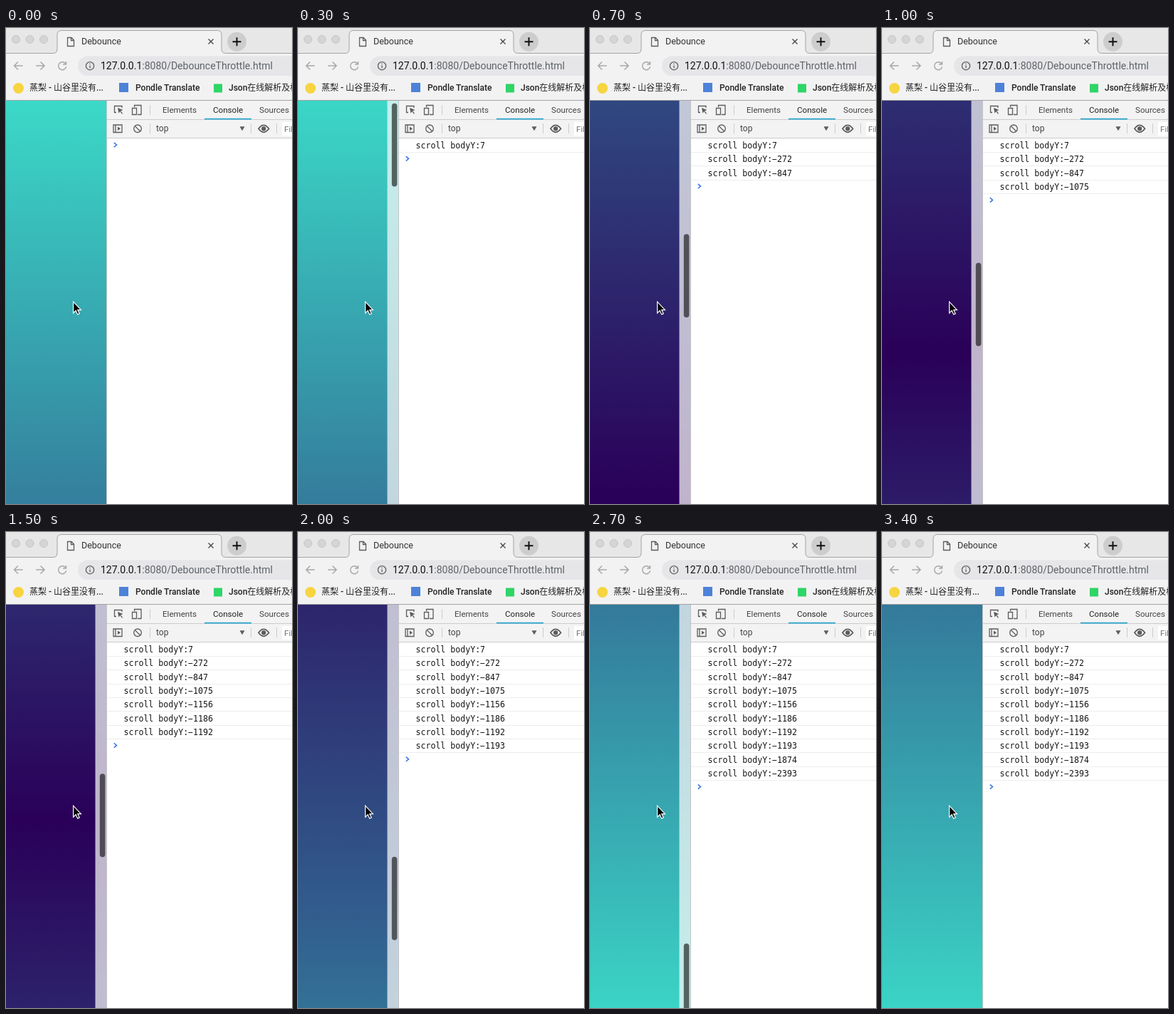
Animation, 402 px wide and 668 px high, one loop 3500 ms. Source, as an HTML page:

```html
<!DOCTYPE html>
<html lang="zh">
<head>
<meta charset="utf-8">
<title>Debounce</title>
<style>
  html, body { margin: 0; height: 100%; overflow: hidden; background: #fff; }
  svg { display: block; width: 402px; height: 668px; }
  text { font: 11.6px Roboto, "Noto Sans CJK SC", sans-serif; fill: #444; }
  .mark { font-size: 12px; font-weight: 500; fill: #222; }
  .log { font: 11.58px "DejaVu Sans Mono", monospace; fill: #151515; }
  .icon { fill: none; stroke: #5c5c5c; stroke-width: 1.3; }
  .rule { stroke: #ccc; }
</style>
</head>
<body>
<svg viewBox="0 0 402 668">
  <defs>
    <linearGradient id="sea" x2="0" y2="1">
      <stop offset="0" stop-color="#3bd9c8"/>
      <stop offset=".25" stop-color="#32618f"/>
      <stop offset=".5" stop-color="#2a0058"/>
      <stop offset=".75" stop-color="#32618f"/>
      <stop offset="1" stop-color="#3bd9c8"/>
    </linearGradient>
  </defs>

  <!-- scrolling page -->
  <rect id="page" width="142" height="3001" fill="url(#sea)"/>
  <g id="bar">
    <rect x="125.500" y="102" width="16.500" height="566" fill="#fafafa" fill-opacity=".72"/>
    <rect id="thumb" x="131.800" width="7.600" height="117" rx="3.800" fill-opacity=".58"/>
  </g>
  <path d="M94.600 384.200v15.800l3.600-3.400 2.400 5.400 2.600-1.100-2.400-5.300h4.600z" stroke="#fff" stroke-width="1.200"/>

  <!-- window frame -->
  <rect width="402" height="102" fill="#e8e7e8"/>
  <path d="M-2 35.500H66Q72 35.500 72 29.500V9.500Q72 3.500 78 3.500H297Q303 3.500 303 9.500V29.500Q303 35.500 309 35.500H404V101.500H-2Z" fill="#f2f2f2" stroke="#a3a3a3"/>
  <g fill="#d6d5d6" stroke="#c6c5c6">
    <circle cx="14" cy="16" r="5.500"/><circle cx="33.500" cy="16" r="5.500"/><circle cx="53" cy="16" r="5.500"/>
  </g>
  <path class="icon" d="M86.500 13.500h5.500l3.500 3.500v8.500h-9zM91.500 13.500v4h4"/>
  <text x="106" y="23.300" style="font-size:12.500px;fill:#333">Debounce</text>
  <path class="icon" d="M284.500 15.500l7 7m0-7l-7 7" style="stroke:#444"/>
  <circle cx="324.500" cy="19.300" r="13.500" fill="#cecdce"/>
  <path d="M318.500 19.300h12M324.500 13.300v12" stroke="#111" stroke-width="2"/>

  <g class="icon" style="stroke:#a9a9a9;stroke-width:1.500">
    <path d="M23.500 53H11.500m5.500-5.500L11.500 53l5.500 5.500M42 53h12m-5.500-5.500L54 53l-5.500 5.500"/>
    <path d="M83.800 50.200A5.500 5.500 0 1 0 84.500 54.500M84.500 47v4h-4.500"/>
  </g>
  <rect x="101" y="39.500" width="330" height="27.500" rx="13.700" fill="#e6e6e9"/>
  <circle class="icon" cx="118" cy="53.200" r="5.600"/>
  <path class="icon" d="M118 52.500v3.800M118 49.700v1.400"/>
  <text x="133" y="58" style="font-size:14px;fill:#111">127.0.0.1<tspan fill="#5f6368">:8080/DebounceThrottle.html</tspan></text>

  <circle cx="17.500" cy="84.500" r="7.500" fill="#f6d541"/>
  <text class="mark" x="33" y="88">蒸梨 - 山谷里没有...</text>
  <rect x="159" y="77" width="13" height="13" fill="#4d82d8"/>
  <text class="mark" x="182" y="88">Pondle Translate</text>
  <rect x="292" y="78.500" width="12" height="12" fill="#2fd566"/>
  <text class="mark" x="313" y="88">Json在线解析及格式化</text>

  <!-- tools panel -->
  <rect x="141" y="102" width="261" height="566" fill="#fff"/>
  <rect x="142" y="102" width="260" height="52" fill="#f3f3f3"/>
  <path d="M141.500 102V668" stroke="#c4c4c4"/>
  <path class="rule" d="M142 128.500H402M142 154.500H402M202.500 108v14M202.500 134v14M344.500 134v14M380.500 134v14"/>
  <path d="M279 127.700h66" stroke="#2aa6cf" stroke-width="1.800"/>
  <g class="icon">
    <path d="M155 118.500h-2.500v-9h10.500v2.500"/>
    <path d="M157 112l7.500 3-3.200 1.300 2.700 3.700-1 .8-2.800-3.700-1.700 2.600z" fill="#5c5c5c" stroke="none"/>
    <path d="M180.500 111v-2.500h9.500v13h-5M177.500 112.500h6v9h-6z"/>
    <path d="M151 136h12v10.500h-12zM154 136v10.500"/>
    <path d="M157 138.500v5.500l4-2.700z" fill="#5c5c5c" stroke="none"/>
    <circle cx="185" cy="141.300" r="5.300"/><path d="M181.300 137.600l7.400 7.400"/>
    <path d="M355 141.300q7-10 14.500 0q-7.500 10-14.500 0z" stroke-width="1.800"/>
    <circle cx="362.200" cy="141.300" r="2.500" fill="#5c5c5c"/>
    <path d="M328.500 138.300h7l-3.500 6z" fill="#5c5c5c" stroke="none"/>
  </g>
  <text x="220" y="119">Elements</text>
  <text x="291" y="119" style="fill:#222">Console</text>
  <text x="356" y="119">Sources</text>
  <text x="211" y="145" style="font-size:12px">top</text>
  <rect x="388" y="132" width="20" height="19" fill="#fff"/>
  <text x="391" y="145.500" style="fill:#777">Filter</text>
  <g id="logs"></g>
  <path id="prompt" d="M151.800 160.800l3.700 3.200-3.700 3.200" fill="none" stroke="#3b78e0" stroke-width="1.600"/>
</svg>
<script>
const $ = id => document.getElementById(id);
const LOOP = 3500, STEP = 100, ROW = 19.35, TOP = 102, MAX = 2401, REST = 1201;

// [time shown, logged offset]
const logs = [[300, 7], [500, -272], [700, -847], [900, -1075], [1100, -1156],
  [1300, -1186], [1500, -1192], [1900, -1193], [2100, -1874], [2300, -2393]];

$('logs').innerHTML = logs.map(([, y], i) => `<g>
  <text class="log" x="165.500" y="${168.8 + ROW * i}">scroll bodyY:${String(y).replace('-', '\u2212')}</text>
  <path d="M142 ${Math.round(174 + ROW * i) + .5}H402" stroke="#ededed"/></g>`).join('');
const rows = [...$('logs').children];

// Two flicks: the first coasts to rest, the second runs past the end and springs back.
function scrollAt(t) {
  if (t < 240) return 0;
  if (t < 500) return 465 * ((t - 240) / 260) ** 2.3;
  if (t < 1830) return REST - 736 * Math.exp((500 - t) / 190);
  if (t < 2000) return REST + 585 * ((t - 1830) / 170) ** 1.3;
  if (t < 2150) return 1786 + 4.1 * (t - 2000);
  const x = (t - 2150) / 60;
  return MAX + 100 * x * Math.exp(-x);
}

function draw(t) {
  const s = scrollAt(t);
  $('page').setAttribute('y', TOP - s);
  $('thumb').setAttribute('y', 102.5 + 475 * Math.min(s, MAX) / MAX);
  $('bar').setAttribute('opacity', t < 240 ? 0 : Math.max(0, Math.min(1, (3000 - t) / 200)));
  const n = logs.filter(([at]) => at <= t).length;
  rows.forEach((row, i) => row.style.display = i < n ? '' : 'none');
  $('prompt').setAttribute('transform', `translate(0 ${ROW * n})`);
}

let start;
function tick(now) {
  start ??= now;
  draw(Math.floor((now - start) % LOOP / STEP) * STEP);
  requestAnimationFrame(tick);
}
draw(0);
requestAnimationFrame(tick);
</script>
</body>
</html>
```
